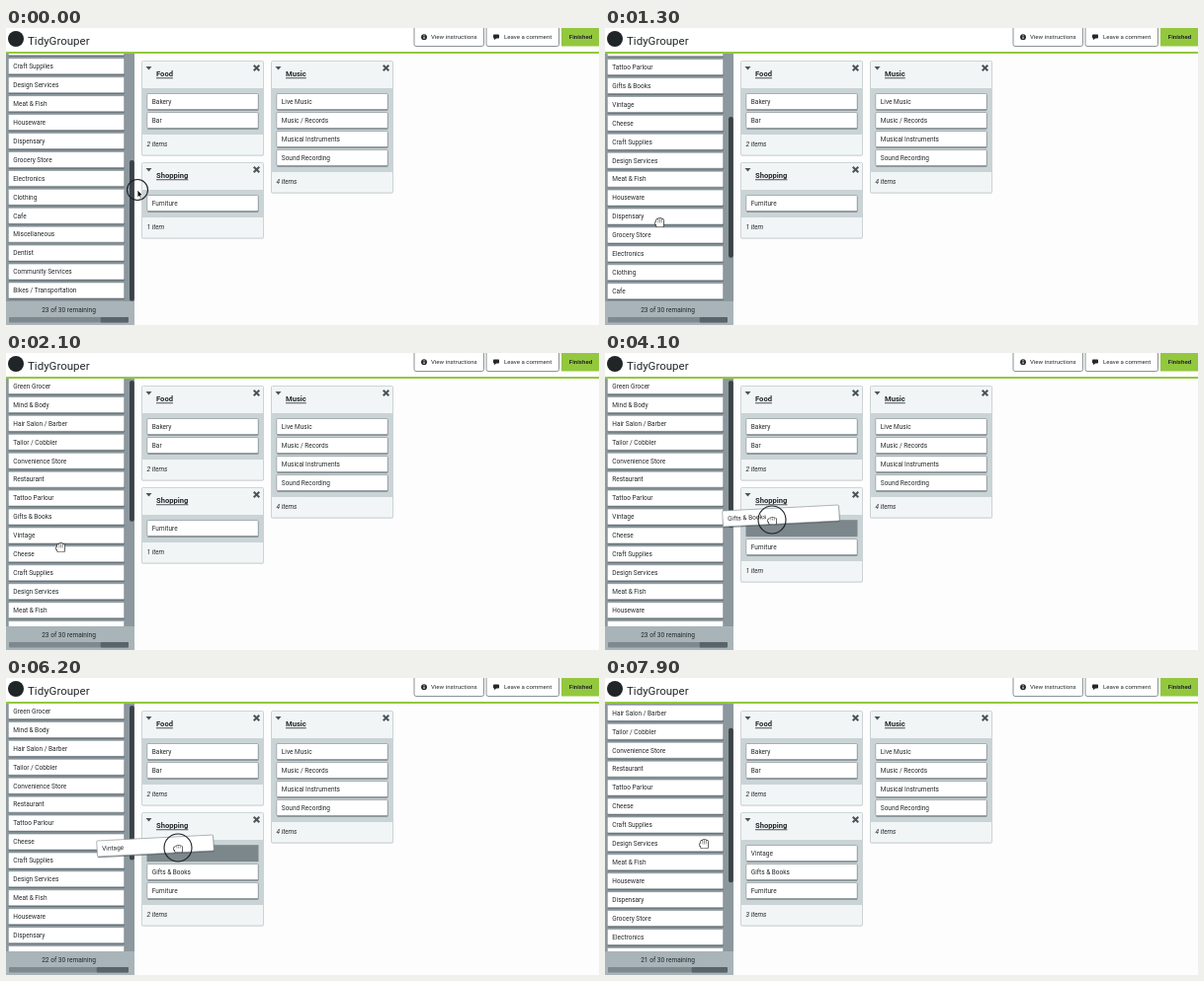
Animation, 600 px wide and 301 px high, one loop 8000 ms. Source, as an HTML page with a canvas:

```html
<!DOCTYPE html>
<html lang="en">
<head>
<meta charset="utf-8">
<title>Card sorting</title>
<style>
  html, body { margin: 0; width: 100%; height: 100%; overflow: hidden; background: #fdfdfd; }
  canvas { display: block; width: 600px; height: 301px; }
</style>
</head>
<body>
<canvas id="stage"></canvas>
<script>
const W = 600, H = 301, LOOP = 8000, STEP = 100;
const ROW = 18.93, LIST_TOP = 26, LIST_BOTTOM = 277;
const FONT = 'Roboto, "Open Sans", sans-serif';
const INK = '#23282b', GREEN = '#93c83e';

const canvas = document.getElementById('stage');
const scale = window.devicePixelRatio || 1;
canvas.width = W * scale;
canvas.height = H * scale;
const g = canvas.getContext('2d');

const CARDS = ['Green Grocer', 'Mind & Body', 'Hair Salon / Barber', 'Tailor / Cobbler',
  'Convenience Store', 'Restaurant', 'Tattoo Parlour', 'Gifts & Books', 'Vintage', 'Cheese',
  'Craft Supplies', 'Design Services', 'Meat & Fish', 'Houseware', 'Dispensary', 'Grocery Store',
  'Electronics', 'Clothing', 'Cafe', 'Miscellaneous', 'Dentist', 'Community Services',
  'Bikes / Transportation'];

// start: picked up, over: enters the group, release: let go, land: in its slot
const DRAGS = [
  { name: 'Gifts & Books', start: 3500, over: 3900, release: 4300, land: 4500, dx: 9, dy: -4 },
  { name: 'Vintage', start: 5300, over: 5700, release: 6300, land: 6500, dx: -23, dy: -2 }
];

// Key rows: time, then values
const SCROLL = [[800, 184], [900, 178], [1300, 107.5], [1800, 18], [2000, 2], [2100, 0],
  [7300, 0], [7500, 6], [7900, 36]];
const RING = [[0, 10.5], [300, 0], [2900, 0], [3300, 14], [4400, 14], [4700, 0],
  [5100, 0], [5400, 14], [6300, 14], [6600, 0]];
const POINTER = [[0, 133, 164], [300, 160, 153], [400, 160, 153], [500, 140, 162], [700, 55, 197],
  [2400, 55, 197], [3000, 52, 169.5], [3500, 52, 169.5], [3700, 80, 169], [3900, 135, 169],
  [4100, 169, 169], [4300, 172, 171], [4800, 172, 171], [5200, 84, 168], [5300, 84, 168],
  [5600, 135, 168], [5800, 165, 169], [6200, 174, 172], [6600, 174, 172], [7200, 100, 168]];

const clamp = v => Math.max(0, Math.min(1, v));
const mix = (a, b, k) => a + (b - a) * k;

function track(keys, t) {
  if (t <= keys[0][0]) return keys[0].slice(1);
  for (let i = 1; i < keys.length; i++) {
    const a = keys[i - 1], b = keys[i];
    if (t < b[0]) {
      const k = (t - a[0]) / (b[0] - a[0]);
      return a.slice(1).map((v, j) => mix(v, b[j + 1], k));
    }
  }
  return keys[keys.length - 1].slice(1);
}

function rect(x, y, w, h, fill) {
  g.fillStyle = fill;
  g.fillRect(x, y, w, h);
}

function round(x, y, w, h, r, fill, line, lineWidth = 1) {
  g.beginPath();
  g.roundRect(x, y, w, h, r);
  if (fill) { g.fillStyle = fill; g.fill(); }
  if (line) { g.strokeStyle = line; g.lineWidth = lineWidth; g.stroke(); }
}

function text(s, x, y, size, style = '', align = 'left') {
  g.font = `${style} ${size}px ${FONT}`;
  g.textAlign = align;
  g.fillStyle = INK;
  g.fillText(s, x, y + size * 0.355);
  return g.measureText(s).width;
}

function shape(points, fill, line) {
  g.beginPath();
  points.forEach(([x, y]) => g.lineTo(x, y));
  g.closePath();
  g.fillStyle = fill;
  g.fill();
  if (line) { g.strokeStyle = line; g.lineWidth = 0.8; g.stroke(); }
}

function card(name, x, y, w) {
  round(x + 0.3, y - 7.4, w, 16.6, 1, 'rgba(70,82,88,.6)');
  round(x, y - 8, w, 16, 1, '#fff', '#7d898e', 0.6);
  text(name, x + 5, y, 6.5);
}

const slot = (x, y, w) => rect(x, y - 8.3, w, 17, '#7c878c');

function group(title, x, y, names) {
  const last = y + 41 + (names.length - 1) * 19;
  const h = last + 35.5 - y;
  round(x, y + 0.6, 123, h, 1, 'rgba(120,132,138,.35)');
  round(x, y, 123, h, 1, '#f1f5f5', '#c3cccf', 0.8);
  rect(x + 0.4, y + 27.5, 122.2, last + 14.5 - y - 27.5, '#cad3d5');
  shape([[x + 4, y + 5.5], [x + 10, y + 5.5], [x + 7, y + 9]], '#4b5459');
  g.strokeStyle = '#4b5459';
  g.lineWidth = 2;
  g.beginPath();
  g.moveTo(x + 113.2, y + 4.2); g.lineTo(x + 118.8, y + 9.8);
  g.moveTo(x + 118.8, y + 4.2); g.lineTo(x + 113.2, y + 9.8);
  g.stroke();
  const w = text(title, x + 14.5, y + 13, 7.6, 'bold');
  rect(x + 14.5, y + 16.9, w, 0.8, INK);
  names.forEach((name, i) => {
    const cy = y + 41 + i * 19;
    if (name) card(name, x + 5.3, cy, 112.4);
    else slot(x + 5, cy, 113);
  });
  const n = names.filter(Boolean).length;
  text(`${n} item${n > 1 ? 's' : ''}`, x + 5, last + 24.5, 6.5, 'italic');
}

function header() {
  rect(0, 0, W, 24, '#fff');
  rect(0, 24, W, 2, GREEN);
  g.fillStyle = '#202528';
  g.beginPath();
  g.arc(10, 11, 8, 0, 7);
  g.fill();
  text('TidyGrouper', 22, 13, 11.5);
  round(413, -3, 70.5, 21.5, 2, '#fff', '#7f868b', 0.9);
  round(486, -3, 73.5, 21.5, 2, '#fff', '#7f868b', 0.9);
  rect(562, 0, 38, 18.5, GREEN);
  text('View instructions', 430, 9.2, 6.1);
  text('Leave a comment', 504, 9.2, 6.1);
  text('Finished', 581.5, 9.2, 6.1, 'bold', 'center');
  g.fillStyle = INK;
  g.beginPath();
  g.arc(423, 9.2, 2.9, 0, 7);
  g.fill();
  rect(422.5, 7.2, 1, 0.9, '#fff');
  rect(422.5, 8.7, 1, 2.3, '#fff');
  round(493, 6.4, 6, 4.2, 0.8, INK);
  shape([[494, 10], [496.5, 10], [494, 12.3]], INK);
}

function sidebar(names, held, scroll, remaining) {
  const view = LIST_BOTTOM - LIST_TOP;
  rect(0, LIST_TOP, 130, view, '#8c989d');
  g.save();
  g.beginPath();
  g.rect(0, LIST_TOP, 130, view);
  g.clip();
  names.forEach((name, i) => {
    const y = 33.5 + i * ROW - scroll;
    if (y < 10 || y > 290) return;
    if (name === held) slot(2, y, 118);
    else card(name, 2.3, y, 117.4);
  });
  const ratio = view / (names.length * ROW);
  round(125, 28 + scroll * ratio, 4.8, view * ratio - 2, 2.2, '#3b4348');
  g.restore();
  rect(0, LIST_BOTTOM, 130, H - LIST_BOTTOM, '#a9b4b8');
  text(`${remaining} of 30 remaining`, 63.5, 285.7, 6.55, '', 'center');
  round(3, 293, 121, 5.5, 1, '#7d898e');
  const left = 3 + 121 * remaining / 30;
  round(left, 293, 124 - left, 5.5, 1, '#596369');
}

function arrow(x, y) {
  shape([[0, 0], [0, 7.8], [1.8, 6.2], [3, 9], [4.3, 8.4], [3.1, 5.8], [5.5, 5.6]]
    .map(([a, b]) => [x + a, y + b]), '#111', '#fff');
}

function hand(x, y, closed) {
  const reach = closed ? 2.4 : 4;
  const parts = [0, 1, 2, 3].map(i => [x - 3 + i * 1.75, y - reach + (i % 3 ? 0 : 0.7), 1.9, 5]);
  parts.push([x - 3, y - 0.6, 7.2, 5], [x - 4.4, y - 0.4, 2.6, 2.6]);
  parts.forEach(p => round(...p, 1, null, '#222', 1.3));
  parts.forEach(p => round(...p, 1, '#fff'));
  g.strokeStyle = '#555';
  g.lineWidth = 0.5;
  g.beginPath();
  for (let i = 0; i < 3; i++) {
    const fx = x - 1.15 + i * 1.75;
    g.moveTo(fx, y - reach + 1);
    g.lineTo(fx, y + 0.6);
  }
  g.stroke();
}

function heldCard(d, t, px, py) {
  const k = clamp((t - d.release) / (d.land - d.release));
  const tilt = -0.051 * clamp((t - d.start) / 400) * (1 - k);
  const w = mix(118, 112.4, k);
  g.save();
  g.translate(mix(px + d.dx, 199, k), mix(py + d.dy, 177.5, k));
  g.rotate(tilt);
  card(d.name, -w / 2, 0, w);
  g.restore();
}

function draw(t) {
  g.setTransform(scale, 0, 0, scale, 0, 0);
  rect(0, 0, W, H, '#fdfdfd');
  const [px, py] = track(POINTER, t);
  const drag = DRAGS.find(d => t >= d.start && t < d.land);
  const moved = DRAGS.filter(d => t >= d.over);
  const landed = DRAGS.filter(d => t >= d.land).length;
  const names = CARDS.filter(c => !moved.some(d => d.name === c));
  const shopping = ['Furniture'];
  moved.forEach(d => shopping.unshift(t < d.land ? null : d.name));

  sidebar(names, drag && drag.name, track(SCROLL, t)[0], 23 - landed);
  header();
  group('Food', 137.5, 33.5, ['Bakery', 'Bar']);
  group('Shopping', 137.5, 136.5, shopping);
  group('Music', 268.5, 33.5,
    ['Live Music', 'Music / Records', 'Musical Instruments', 'Sound Recording']);
  if (drag) heldCard(drag, t, px, py);

  const r = track(RING, t)[0];
  if (r > 0) {
    g.strokeStyle = '#1c1f21';
    g.lineWidth = 1.1;
    g.beginPath();
    g.arc(px, py, r, 0, 7);
    g.stroke();
  }
  const onCard = px < 120 || (px > 143 && px < 255 && py > 166);
  if (drag || onCard) hand(px, py, !!drag);
  else arrow(px, py);
}

const began = performance.now();
function tick() {
  const t = (performance.now() - began) % LOOP;
  draw(Math.floor(t / STEP) * STEP);
  requestAnimationFrame(tick);
}
tick();
</script>
</body>
</html>
```
